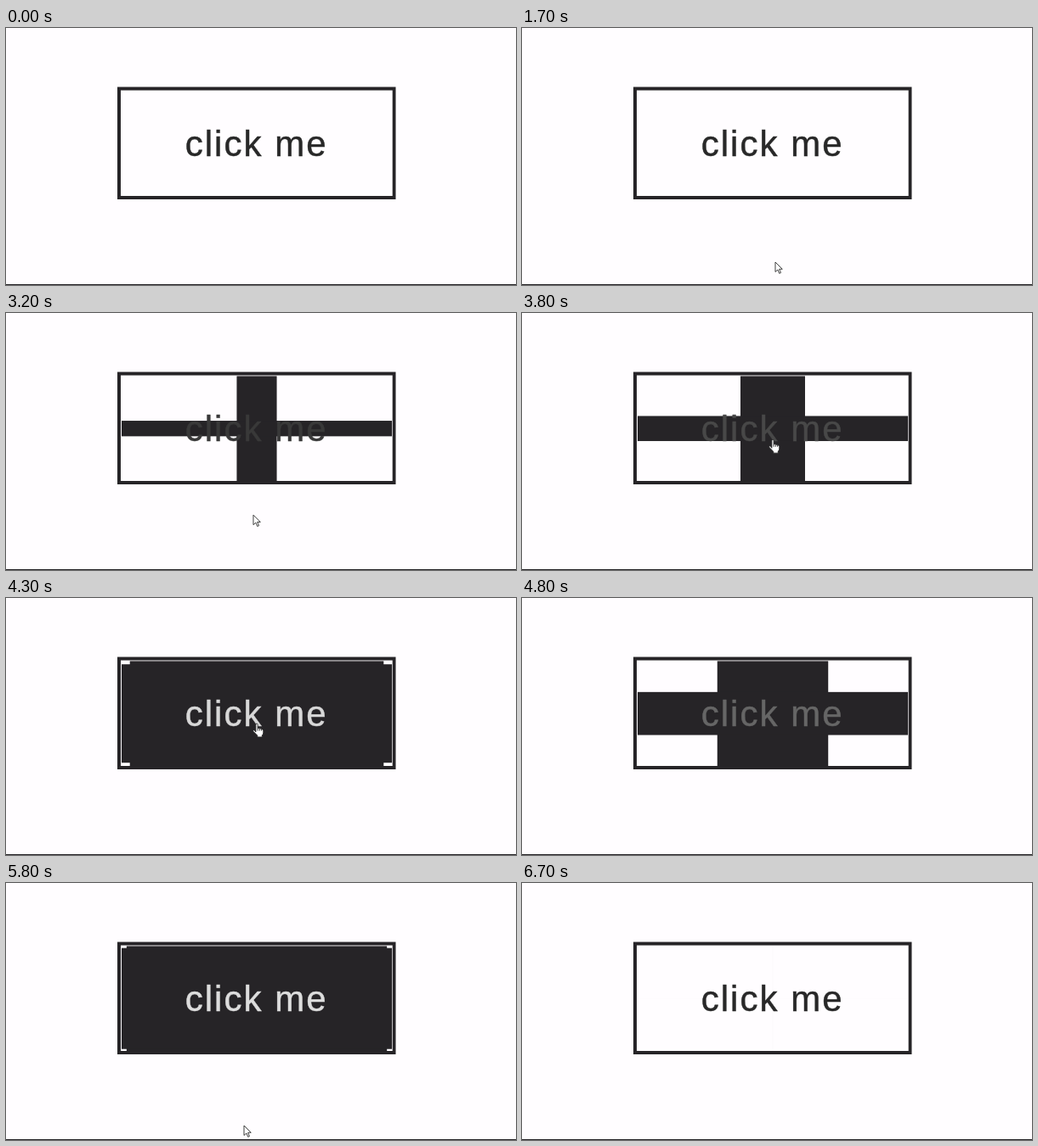
An HTML page that plays this animation: 600x303 px, repeating every 7.5 s.

```html
<!DOCTYPE html>
<html lang="en">
<head>
<meta charset="utf-8">
<title>Button hover</title>
<style>
  html, body { margin: 0; width: 100%; height: 100%; overflow: hidden; background: #fffdff; }
  svg { display: block; width: 600px; height: 303px; }
  text { font: 42px "Liberation Sans", Arial, sans-serif; letter-spacing: 2.05px; stroke-width: .45; }
  .ink { fill: #262427; }
  .cursor { fill: #fff; stroke: #222; stroke-width: 1.2; stroke-linejoin: round; }
</style>
</head>
<body>
<svg viewBox="0 0 600 303">
  <rect width="600" height="303" fill="#fffdff"/>
  <path class="ink" fill-rule="evenodd" d="M131 69.5H458.5V202H131ZM135 73.5V198H454.7V73.5Z"/>
  <rect id="column" class="ink"/>
  <rect id="row" class="ink"/>
  <text id="label" x="210.7" y="151">click me</text>
  <rect class="ink" y="302" width="600" height="1"/>
  <g id="pointer" class="cursor">
    <path id="arrow" transform="scale(.72)" d="M0 0V16L4 12.5L6.5 18.5L9 17.5L6.5 11.5H11.5Z"/>
    <path id="hand" transform="scale(.74) translate(-6.5 -.5)"
      d="M5 14V2.5Q5 .5 6.5 .5T8 2.5V8Q11 7 11 8.5Q14 8 14 9.5Q17 9 17 11.5V15Q17 18 15 19V22H7.5V19.5L1 13Q0 11 1.5 10.8T5 14ZM8 8V12M11 8.5V12M14 9.5V12"/>
  </g>
</svg>
<script>
const LOOP = 7500, STEP = 100, FADE = 960;
const CENTER = { x: 295, y: 136.2 }, SIZE = { w: 318, h: 123.6 };
const EDGE = 202, REACH = 69;

const $ = id => document.getElementById(id);
const mix = (a, b, k) => a + (b - a) * k;
const set = (el, attrs) => { for (const k in attrs) el.setAttribute(k, attrs[k]); };
const show = (el, on) => set(el, { display: on ? "inline" : "none" });

// Spells the pointer spends below the button; it hovers in between
const outings = [
  { from: 1700, to: 1790, x: 298, drop: 74 },
  { from: 2670, to: 3632, x: 289, drop: 54 },
  { from: 4477, to: 5020, x: 291, drop: 29 },
  { from: 5755, to: Infinity, x: 280, drop: 84 }
];
const visible = t => (t >= 1700 && t < 4800) || (t >= 4900 && t < 5900);

// CSS "ease": cubic-bezier(.25, .1, .25, 1), solved by bisection
function ease(x) {
  if (x <= 0) return 0;
  if (x >= 1) return 1;
  const curve = (a, b, s) => 3 * a * s * (1 - s) ** 2 + 3 * b * s * s * (1 - s) + s ** 3;
  let lo = 0, hi = 1;
  for (let i = 0; i < 24; i++) {
    const mid = (lo + hi) / 2;
    if (curve(.25, .25, mid) < x) lo = mid; else hi = mid;
  }
  return curve(.1, 1, lo);
}

// Fill amount; interrupted transitions reverse in a shortened time
function fillAt(t) {
  let value = 0;
  const fade = (goal, start, end) => {
    const time = FADE * Math.abs(goal - value);
    if (time && end > start) value = mix(value, goal, ease((end - start) / time));
  };
  outings.forEach(({ from, to }, i) => {
    const next = outings[i + 1]?.from ?? Infinity;
    fade(0, from, Math.min(t, to));
    fade(1, to, Math.min(t, next));
  });
  return value;
}

function pointerAt(t) {
  const i = outings.findLastIndex(o => o.from <= t);
  const out = outings[i];
  if (t < out.to) {
    const k = Math.sqrt(1 - (t - out.from) / (out.to - out.from));
    return { x: mix(CENTER.x, out.x, k), y: EDGE + out.drop * k, over: false };
  }
  const u = (t - out.to) / (outings[i + 1].from - out.to);
  return { x: CENTER.x, y: EDGE - REACH * Math.sqrt(Math.sin(Math.PI * u)), over: true };
}

function bar(el, w, h) {
  set(el, { x: CENTER.x - w / 2, y: CENTER.y - h / 2, width: w, height: h });
}

function draw(t) {
  const fill = fillAt(t);
  bar($("column"), SIZE.w * fill, SIZE.h);
  bar($("row"), SIZE.w, SIZE.h * fill);
  const tone = Math.round(mix(40, 230, fill ** 1.25));
  const color = `rgb(${tone},${tone},${tone})`;
  set($("label"), { fill: color, stroke: color });

  show($("pointer"), visible(t));
  if (!visible(t)) return;
  const { x, y, over } = pointerAt(t);
  set($("pointer"), { transform: `translate(${x} ${y})` });
  show($("hand"), over);
  show($("arrow"), !over);
}

const begin = performance.now();
function tick() {
  const t = (performance.now() - begin) % LOOP;
  draw(Math.floor(t / STEP) * STEP);
  requestAnimationFrame(tick);
}
tick();
</script>
</body>
</html>
```
